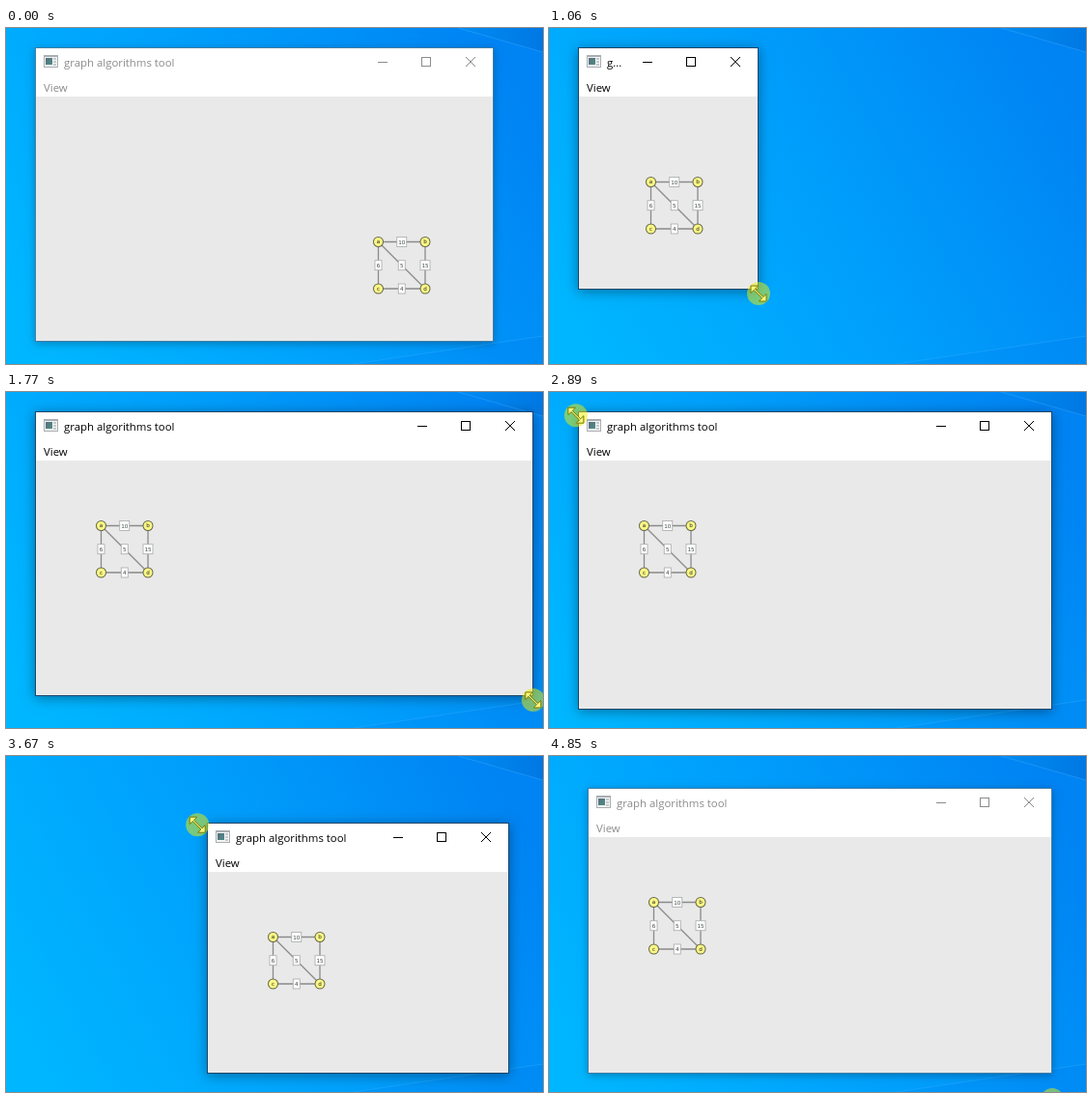
These frames come from a looping animation (556x348 px, 4880 ms). An HTML page with a canvas:

```html
<!DOCTYPE html>
<html lang="en">
<head>
<meta charset="utf-8">
<title>Window resizing</title>
<style>
  html, body { margin: 0; width: 100%; height: 100%; overflow: hidden; }
  canvas { display: block; }
</style>
</head>
<body>
<canvas id="stage" width="556" height="348"></canvas>
<script>
const ctx = document.getElementById('stage').getContext('2d');
const LOOP = 4880;
const DRAG_CORNER = 560, REBOUND = 1110, RELEASE = 1960;
const DRAG_ORIGIN = 2890, DROP = 4050, BLUR = 4850;
const WINDOW_LAG = 15;
const UI_FONT = '11.4px "Open Sans", "Noto Sans", sans-serif';
const GRAPH_FONT = '5.6px "DejaVu Sans", sans-serif';
const TITLE = 'graph algorithms tool';

// Pointer strokes; each continues from the previous one, curving towards "bend".
const entry = [504, 372];
const strokes = [
  { start: 90, end: 370, steps: 6, to: [504, 325] },
  { start: DRAG_CORNER, end: 1060, steps: 12, to: [217, 275], bend: [501, 323] },
  { start: REBOUND, end: 1630, steps: 12, to: [453, 308], bend: [172, 220] },
  { start: 1680, end: RELEASE, steps: 7, to: [521, 333], bend: [617, 321] },
  { start: 2180, end: 2650, steps: 11, to: [27, 24] },
  { start: DRAG_ORIGIN, end: 3400, steps: 12, to: [305, 94], bend: [20, 22] },
  { start: 3460, end: 3960, steps: 10, to: [38, 37] },
  { start: 4000, end: DROP, steps: 2, to: [37, 37] },
  { start: 4190, end: 4650, steps: 11, to: [475, 340] },
  { start: BLUR, end: BLUR, steps: 1, to: [521, 356] }
];

const interval = ({ start, end, steps }) => (end - start) / (steps - 1) || 1;

// The picture only changes at the steps of a stroke.
function snapTime(time) {
  const stroke = strokes.findLast(s => s.start <= time);
  if (!stroke) return 0;
  const index = Math.floor((time - stroke.start) / interval(stroke) + 0.1);
  return stroke.start + Math.min(index, stroke.steps - 1) * interval(stroke);
}

function pointerAt(time) {
  let position = entry;
  for (const stroke of strokes) {
    if (time < stroke.start) break;
    const { start, steps, to } = stroke;
    const from = position;
    const u = Math.min(1, ((time - start) / interval(stroke) + 1) / steps);
    position = from.map((p, axis) => {
      const bend = stroke.bend ? stroke.bend[axis] : (p + to[axis]) / 2;
      return (1 - u) ** 2 * p + 2 * u * (1 - u) * bend + u * u * to[axis];
    });
  }
  return position;
}

function windowAt(time) {
  const box = { left: 31, top: 21, right: 504, bottom: 324 };
  if (time >= DRAG_CORNER) {
    const [x, y] = pointerAt(Math.min(time, RELEASE));
    box.right = Math.round(x - 1);
    box.bottom = Math.round(y - 5);
  }
  if (time > DRAG_ORIGIN) {
    const [x, y] = pointerAt(Math.min(time, DROP) - WINDOW_LAG);
    box.left = Math.round(x + 4);
    box.top = Math.round(y - 3);
  }
  return box;
}

// The shrinking corner pushes the graph, which then keeps its place in the window.
function graphAt(time, box) {
  if (time < DRAG_CORNER) return [385, 221];
  if (time < REBOUND) return [Math.min(385, box.right - 111), box.bottom - 111];
  return [box.left + 67, box.top + 117];
}

function polygon(points, fill, stroke) {
  ctx.beginPath();
  points.forEach(([x, y]) => ctx.lineTo(x, y));
  ctx.closePath();
  ctx.fillStyle = fill;
  ctx.fill();
  if (stroke) {
    ctx.strokeStyle = stroke;
    ctx.lineWidth = 1;
    ctx.stroke();
  }
}

function line(x0, y0, x1, y1, color, width = 1) {
  ctx.beginPath();
  ctx.moveTo(x0, y0);
  ctx.lineTo(x1, y1);
  ctx.strokeStyle = color;
  ctx.lineWidth = width;
  ctx.stroke();
}

function rect(x, y, w, h, fill) {
  ctx.fillStyle = fill;
  ctx.fillRect(x, y, w, h);
}

function disc(x, y, radius, fill) {
  ctx.beginPath();
  ctx.arc(x, y, radius, 0, 2 * Math.PI);
  ctx.fillStyle = fill;
  ctx.fill();
}

function text(string, x, y, color, font, align = 'left') {
  ctx.font = font;
  ctx.textAlign = align;
  ctx.fillStyle = color;
  ctx.fillText(string, x, y);
}

function gradient(x0, y0, x1, y1, ...colors) {
  const g = ctx.createLinearGradient(x0, y0, x1, y1);
  colors.forEach((color, i) => g.addColorStop(i / (colors.length - 1), color));
  return g;
}

function drawWallpaper() {
  rect(0, 0, 556, 348, gradient(40, 340, 540, 60, '#00b6ff', '#009ffc', '#0083f3'));
  polygon([[468, 0], [556, 25], [556, 0]], gradient(468, 0, 556, 10, '#008cf3', '#0078e4'));
  line(468, 0, 556, 25, 'rgba(50,165,255,.5)');
  polygon([[360, 348], [556, 319], [556, 348]], 'rgba(0,110,225,.12)');
  line(360, 348, 556, 319, 'rgba(50,175,255,.4)');
}

function fitTitle(width) {
  ctx.font = UI_FONT;
  if (ctx.measureText(TITLE).width <= width) return TITLE;
  let length = TITLE.length;
  while (length > 1 && ctx.measureText(TITLE.slice(0, length) + '...').width > width) length--;
  return TITLE.slice(0, length) + '...';
}

function drawIcon(x, y) {
  rect(x, y, 15, 13, '#a9aeb2');
  rect(x + 1, y + 2, 13, 10, '#f4f4f4');
  rect(x + 2, y + 3, 7, 7, gradient(x, y + 3, x + 8, y + 10, '#5a6a80', '#4f8b84'));
  for (let row = 3; row < 12; row += 3) rect(x + 10, y + row, 3, 2, '#c5cacd');
}

function drawWindow({ left, top, right, bottom }, active) {
  const w = right - left, h = bottom - top;
  const ink = active ? '#000' : '#8b8b8b';
  ctx.save();
  ctx.shadowColor = active ? 'rgba(0,0,0,.38)' : 'rgba(0,0,0,.28)';
  ctx.shadowBlur = active ? 12 : 8;
  ctx.shadowOffsetY = 2;
  rect(left - 1, top - 1, w + 2, h + 2, active ? '#17456a' : '#3f7ea8');
  ctx.restore();
  rect(left, top, w, h, '#fff');
  rect(left, top + 50, w, h - 50, '#e9e9e9');

  drawIcon(left + 8, top + 7);
  text(fitTitle(w - 167), left + 29, top + 19, ink, UI_FONT);
  text('View', left + 8, top + 45, ink, UI_FONT);

  const y = top + 14.5;
  line(right - 119, y, right - 109, y, ink);
  ctx.strokeRect(right - 73.5, top + 9.5, 9, 9);
  line(right - 28, top + 9, right - 18, top + 19, ink);
  line(right - 18, top + 9, right - 28, top + 19, ink);
}

const SIDE = 48.5;
const NODES = { a: [0, 0], b: [SIDE, 0], c: [0, SIDE], d: [SIDE, SIDE] };
const EDGES = { ab: 10, ac: 6, ad: 5, bd: 15, cd: 4 };

function drawGraph(x, y) {
  ctx.save();
  ctx.translate(x + 0.5, y + 0.5);
  for (const [edge, weight] of Object.entries(EDGES)) {
    const [[x0, y0], [x1, y1]] = [...edge].map(name => NODES[name]);
    const cx = (x0 + x1) / 2, cy = (y0 + y1) / 2;
    const w = weight > 9 ? 10 : 7;
    line(x0, y0, x1, y1, '#8a8a8a', 1.3);
    rect(cx - w / 2, cy - 5, w, 10, '#fff');
    ctx.strokeStyle = '#a8a8a8';
    ctx.lineWidth = 0.8;
    ctx.strokeRect(cx - w / 2, cy - 5, w, 10);
    text(weight, cx, cy + 2, '#3c474c', GRAPH_FONT, 'center');
  }
  for (const [name, [cx, cy]] of Object.entries(NODES)) {
    disc(cx, cy, 5.5, '#66664a');
    disc(cx, cy, 4.5, '#fbf985');
    text(name, cx, cy + 1.8, '#222', GRAPH_FONT, 'center');
  }
  ctx.restore();
}

const ARROW = [[0, 0], [0, 16], [4, 12.5], [6.5, 18], [9, 17], [6.5, 11.5], [11.5, 11.5]];
const HALF_RESIZE = [[-4.8, -3.6], [-8, -0.5], [-8, -8], [-0.5, -8], [-3.6, -4.8]];
const RESIZE = [...HALF_RESIZE, ...HALF_RESIZE.map(([x, y]) => [-x, -y])];

function drawPointer(x, y, box) {
  const nearCorner = Math.hypot(x - box.left, y - box.top) < 16 ||
    Math.hypot(x - box.right, y - box.bottom) < 16;
  ctx.save();
  ctx.translate(x, y);
  polygon(nearCorner ? RESIZE : ARROW, '#fff', '#000');
  disc(0, 0, 12, 'rgba(242,240,0,.5)');
  ctx.restore();
}

function draw(elapsed) {
  const time = snapTime(elapsed % LOOP);
  const box = windowAt(time);
  drawWallpaper();
  drawWindow(box, time >= DRAG_CORNER && time < BLUR);
  drawGraph(...graphAt(time, box));
  drawPointer(...pointerAt(time), box);
}

const start = performance.now();
function tick() {
  draw(performance.now() - start);
  requestAnimationFrame(tick);
}
tick();
</script>
</body>
</html>
```
